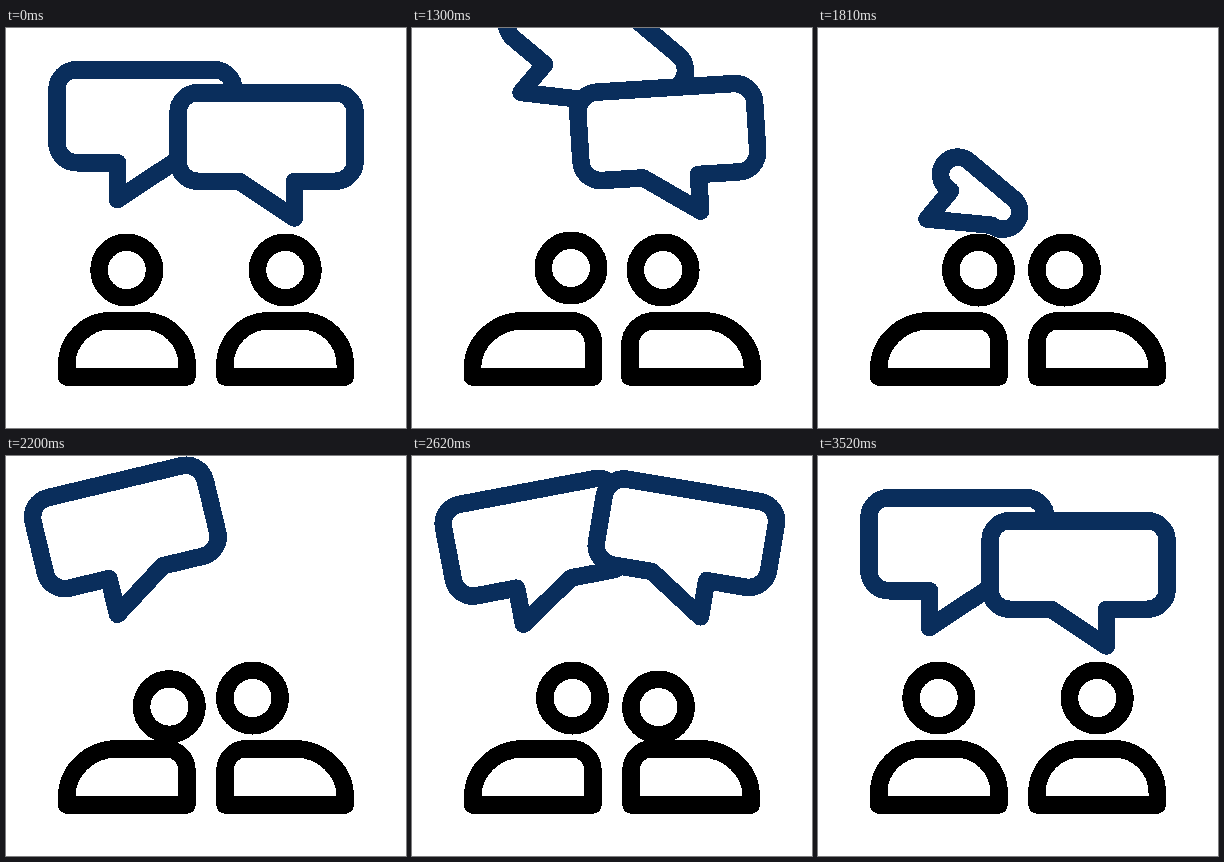
An HTML page that plays this animation: 400 px wide and 400 px high, repeating every 3.55 s.

```html
<!DOCTYPE html>
<html lang="en">
<head>
<meta charset="utf-8">
<title>Two people talking</title>
<style>
  html, body { margin: 0; width: 100%; height: 100%; overflow: hidden; background: #fff; }
  svg { display: block; width: 100vw; height: 100vh; }
  path, circle { fill: none; stroke: #000; stroke-width: 17.5; stroke-linejoin: round; }
  .bubble { stroke: #0a2e5c; }
  .front { fill: #fff; }
</style>
</head>
<body>
<svg viewBox="0 0 400 400" shape-rendering="crispEdges">
  <g id="left"><path class="body"/><circle class="head" r="27.75"/></g>
  <g id="right" transform="translate(400) scale(-1 1)"><path class="body"/><circle class="head" r="27.75"/></g>
  <path class="bubble" id="back"/>
  <g transform="translate(400) scale(-1 1)"><path class="bubble front" id="front"/></g>
</svg>
<script>
const LOOP = 3550, HOLD = 1030, STEP = 30;
const $ = s => document.querySelector(s);

// Both sides share one geometry and one set of moves; the right one is mirrored.
const side = (who, bubble, timing) => ({
  head: $(who + ' .head'), body: $(who + ' .body'), bubble: $(bubble), ...timing
});
const sides = [
  side('#left', '#back', { tipY: 171.5, height: 93, lean: 1000, reach: 39.75, sway: 3, leave: 1000, pop: 1720 }),
  side('#right', '#front', { tipY: 190, height: 88.5, lean: 1040, reach: 32.75, sway: 0, leave: 1200, pop: 2210 })
];

const ramp = (t, start, span) => Math.min(1, Math.max(0, (t - start) / span));
const easeOut = (t, start, span, power) => 1 - (1 - ramp(t, start, span)) ** power;
const easeInOut = (t, start, span) => {
  const x = ramp(t, start, span);
  return x * x * (3 - 2 * x);
};
const hump = (t, start, span) => Math.sin(Math.PI * ramp(t, start, span)) ** 2;
const mix = (a, b, x) => a + (b - a) * x;

function bodyPath(bend) {
  const bulge = 10 * bend * (1 - bend);
  const l = 60.75 - bulge, r = 181 + bulge, top = 292.75, base = 349;
  const rx = mix(44, 51, bend), ry = mix(44, 48, bend), rr = mix(44, 21.5, bend);
  return `M${l} ${base}V${top + ry}A${rx} ${ry} 0 0 1 ${l + rx} ${top}` +
    `H${r - rr}A${rr} ${rr} 0 0 1 ${r} ${top + rr}V${base}Z`;
}

// The tip of the tail is the origin.
function bubblePath(grow, height) {
  const h = height * grow, R = Math.min(20, h / 2), base = -36.75, top = base - h;
  const l = -60.6 * grow, r = 55.5 + 61 * grow ** 1.4;
  const arc = (x, y) => `A${R} ${R} 0 0 1 ${x} ${y}`;
  return `M0 0V${base}H${l + R}${arc(l, base - R)}V${top + R}${arc(l + R, top)}` +
    `H${r - R}${arc(r, top + R)}V${base - R}${arc(r - R, base)}H${Math.min(55.5, r - R)}Z`;
}

// Swings away and up before q = 0, then unfolds, overshoots and settles.
function bubblePose({ tipY, leave, pop }, t) {
  const q = t - pop;
  if (q <= 0) {
    const s = Math.max(0, t - leave) / 300;
    return { scale: s < 1.7 ? 1 : 0, grow: 1, turn: 40 * Math.min(1, s ** 2.2), y: tipY - 107 * s ** 2.5 };
  }
  const rise = mix(191, 158, easeOut(q, 90, 420, 1.7));
  const swing = mix(40, -16, easeOut(q, 90, 540, 2.4));
  return {
    scale: ramp(q, 0, 90),
    grow: easeOut(q, 0, 500, 2.33),
    turn: mix(swing, 0, easeInOut(q, 650, 650)),
    y: mix(rise, tipY, easeInOut(q, 600, 440))
  };
}

function draw(t) {
  for (const s of sides) {
    const lean = easeInOut(t, s.lean, 340) - easeInOut(t, s.lean + 1750, 640);
    const nod = hump(t, s.pop + 110, 640);
    s.head.setAttribute('cx', 120.75 + s.reach * lean + s.sway * nod);
    s.head.setAttribute('cy', 242 + 9.2 * nod - 2 * hump(t, s.leave + 100, 400));
    s.body.setAttribute('d', bodyPath(lean));

    const { scale, grow, turn, y } = bubblePose(s, t);
    const x = 111.5 - Math.max(0, turn) / 16;
    s.bubble.setAttribute('visibility', scale > 0 ? 'visible' : 'hidden');
    s.bubble.setAttribute('d', bubblePath(grow, s.height));
    s.bubble.setAttribute('transform', `translate(${x} ${y}) rotate(${turn}) scale(${scale})`);
  }
}

const start = performance.now();
function tick() {
  const t = (performance.now() - start) % LOOP;
  draw(t < HOLD ? 0 : HOLD + Math.floor((t - HOLD) / STEP) * STEP);
  requestAnimationFrame(tick);
}
tick();
</script>
</body>
</html>
```
